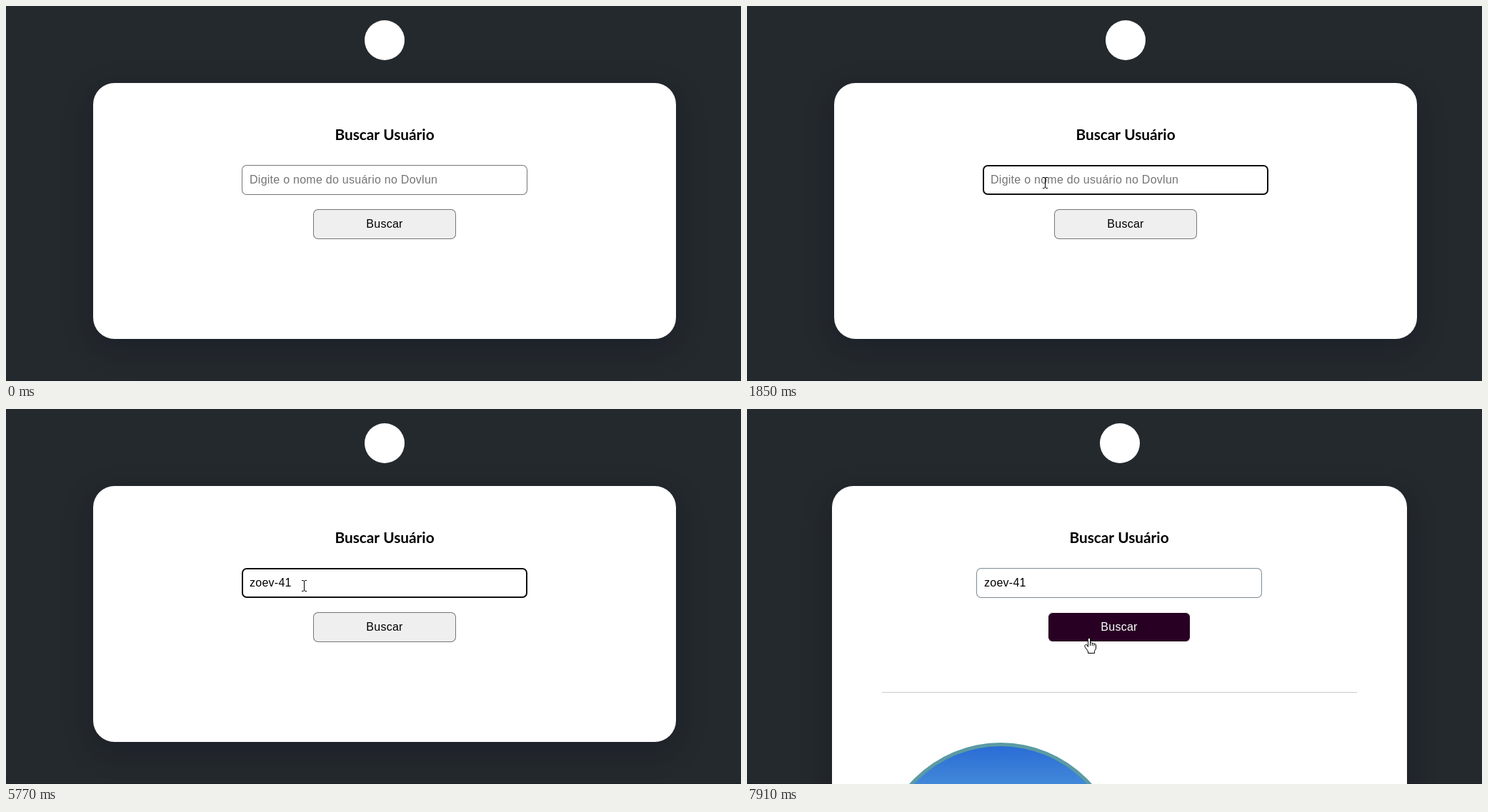
An HTML page with a canvas for the animation above (8 s loop, 1029 by 526 pixels).

```html
<!DOCTYPE html>
<html lang="pt">
<head>
<meta charset="utf-8">
<title>Buscar Usuário</title>
<style>
  html, body { margin: 0; width: 100%; height: 100%; overflow: hidden; background: #24292d; }
  canvas { display: block; }
</style>
</head>
<body>
<canvas id="stage" width="1029" height="526"></canvas>
<script>
const ctx = document.getElementById('stage').getContext('2d');
const LOOP = 8000, STEP = 70, BLINK = 530, FADE = 140;
const FOCUS_AT = 1320, CLICK_AT = 7040, RESULT_AT = 7910;
const UI_FONT = '16px "Liberation Sans", Arial, sans-serif';
const TITLE_FONT = '700 20.8px Lato, sans-serif';
const USER = 'zoev-41';
const KEY_TIMES = [2710, 2990, 3650, 4050, 4650, 4980, 5240];
const HOVERS = [[480, 690], [6640, LOOP * 2]];

// Pointer hot spot: time, x, y
const TRACK = [
  [130, 932, 493], [340, 718, 396], [480, 590, 335], [620, 510, 300],
  [690, 478, 284], [830, 455, 279], [900, 450, 269], [1040, 425, 254],
  [1110, 417, 248], [6500, 417, 248], [6570, 424, 260], [6640, 444.5, 298],
  [6780, 458, 310], [7110, 479, 321]
];

const ARROW = new Path2D('M0 0V16.5L3.8 13L6.5 19L9 18L6.4 12.2H11.7Z');
const HAND = new Path2D('M5.5 12.5V1.5L6.5.5H7.5L8.5 1.5V6.5L10 6.5L11 7.5L13 7.5L14 8.5L15.5 8.5L16.5 10V15L14.5 18.5V21.5H5.5V19L1 12.5V10.5L2 9.5H3.5Z');
const HAND_LINES = new Path2D('M8.5 6.5V11M11.2 7.5V11M13.9 8.5V11.5');
const BEAM = new Path2D('M-3 -7.5H-1L.5 -6.5L2 -7.5H4M.5 -6.5V6.5M-3 7.5H-1L.5 6.5L2 7.5H4');

const clamp = v => Math.max(0, Math.min(1, v));

function box(x, y, w, h, r, fill) {
  ctx.beginPath();
  ctx.roundRect(x, y, w, h, r);
  ctx.fillStyle = fill;
  ctx.fill();
}

function bordered(x, y, w, h, line, border, fill) {
  box(x, y, w, h, 7, border);
  box(x + line, y + line, w - 2 * line, h - 2 * line, 7 - line, fill);
}

function disc(x, y, r, fill) {
  ctx.beginPath();
  ctx.arc(x, y, r, 0, Math.PI * 2);
  ctx.fillStyle = fill;
  ctx.fill();
}

function text(str, x, y, color, align = 'left', font = UI_FONT) {
  ctx.font = font;
  ctx.letterSpacing = font === UI_FONT ? '0.26px' : '0px';
  ctx.textAlign = align;
  ctx.fillStyle = color;
  ctx.fillText(str, x, y);
}

function hoverLevel(t) {
  return Math.max(...HOVERS.map(([enter, leave]) =>
    Math.min(clamp((t - enter) / FADE), clamp(1 - (t - leave) / FADE))));
}

function drawCard(result) {
  const left = result ? 119 : 122, width = result ? 805 : 816;
  ctx.save();
  ctx.shadowColor = 'rgba(14,14,34,.3)';
  ctx.shadowBlur = 40;
  ctx.shadowOffsetY = 12;
  box(left, 108, width, result ? 900 : 359, 30, '#fff');
  ctx.restore();
}

function drawField(x, t, result) {
  const focused = t >= FOCUS_AT && t < CLICK_AT;
  const idle = result ? '#7a8c94' : '#767676';
  bordered(x, 223, 400, 42, focused ? 2 : 1, focused ? '#101010' : idle, '#fff');

  const count = KEY_TIMES.filter(k => k <= t).length;
  const typed = USER.slice(0, count);
  if (count) text(typed, x + 11, 249, '#000');
  else text('Digite o nome do usuário no Dovlun', x + 11, 249, '#757575');

  const since = t - (count ? KEY_TIMES[count - 1] : FOCUS_AT);
  if (focused && Math.floor(since / BLINK) % 2 === 0) {
    const advance = count ? ctx.measureText(typed).width : 0;
    ctx.fillStyle = '#000';
    ctx.fillRect(Math.round(x + 11 + advance), 235, 1, 19);
  }
}

function drawButton(x, t) {
  bordered(x, 285, 200, 42, 1, '#767676', '#efefef');
  text('Buscar', x + 100, 311, '#000', 'center');
  ctx.globalAlpha = hoverLevel(t);
  bordered(x, 285, 200, 42, 1, '#fff', '#280023');
  text('Buscar', x + 100, 311, '#fff', 'center');
  ctx.globalAlpha = 1;
}

function drawProfile() {
  ctx.fillStyle = '#c6cccf';
  ctx.fillRect(189, 397, 665, 1);
  const sky = ctx.createLinearGradient(0, 473, 0, 526);
  sky.addColorStop(0, '#2a6cd6');
  sky.addColorStop(1, '#4288d8');
  disc(355, 638, 170, '#5b9ba3');
  disc(355, 638, 165, sky);
}

function pointerAt(t) {
  const next = TRACK.findIndex(p => p[0] > t);
  if (next < 0) return TRACK[TRACK.length - 1].slice(1);
  const [t0, x0, y0] = TRACK[next - 1], [t1, x1, y1] = TRACK[next];
  const u = (t - t0) / (t1 - t0);
  return [x0 + (x1 - x0) * u, y0 + (y1 - y0) * u];
}

function drawPointer(t) {
  if (t < TRACK[0][0]) return;
  const [x, y] = pointerAt(t - (t - TRACK[0][0]) % STEP);
  const inside = (l, top, r, b) => x >= l && x < r && y >= top && y < b;
  ctx.save();
  ctx.translate(Math.round(x), Math.round(y));
  ctx.lineWidth = 1;
  ctx.strokeStyle = '#000';
  if (inside(330, 223, 730, 265)) {
    ctx.stroke(BEAM);
  } else if (inside(430, 285, 630, 327)) {
    ctx.translate(-7, 0);
    ctx.fillStyle = '#fff';
    ctx.fill(HAND);
    ctx.stroke(HAND);
    ctx.stroke(HAND_LINES);
  } else {
    ctx.strokeStyle = '#fff';
    ctx.fillStyle = '#000';
    ctx.fill(ARROW);
    ctx.stroke(ARROW);
  }
  ctx.restore();
}

function draw(t) {
  const result = t >= RESULT_AT;
  const shift = result ? -9 : 0;
  ctx.fillStyle = '#24292d';
  ctx.fillRect(0, 0, 1029, 526);
  ctx.fillStyle = '#1c2024';
  ctx.fillRect(0, 525, 1029, 1);
  disc(result ? 522 : 530, 48, 28, '#fff');
  drawCard(result);
  text('Buscar Usuário', 530 + shift, 188, '#000', 'center', TITLE_FONT);
  drawField(330 + shift, t, result);
  drawButton(430 + shift, t);
  if (result) drawProfile();
  drawPointer(t);
}

const start = performance.now();
function tick() {
  draw((performance.now() - start) % LOOP);
  requestAnimationFrame(tick);
}
tick();
</script>
</body>
</html>
```
